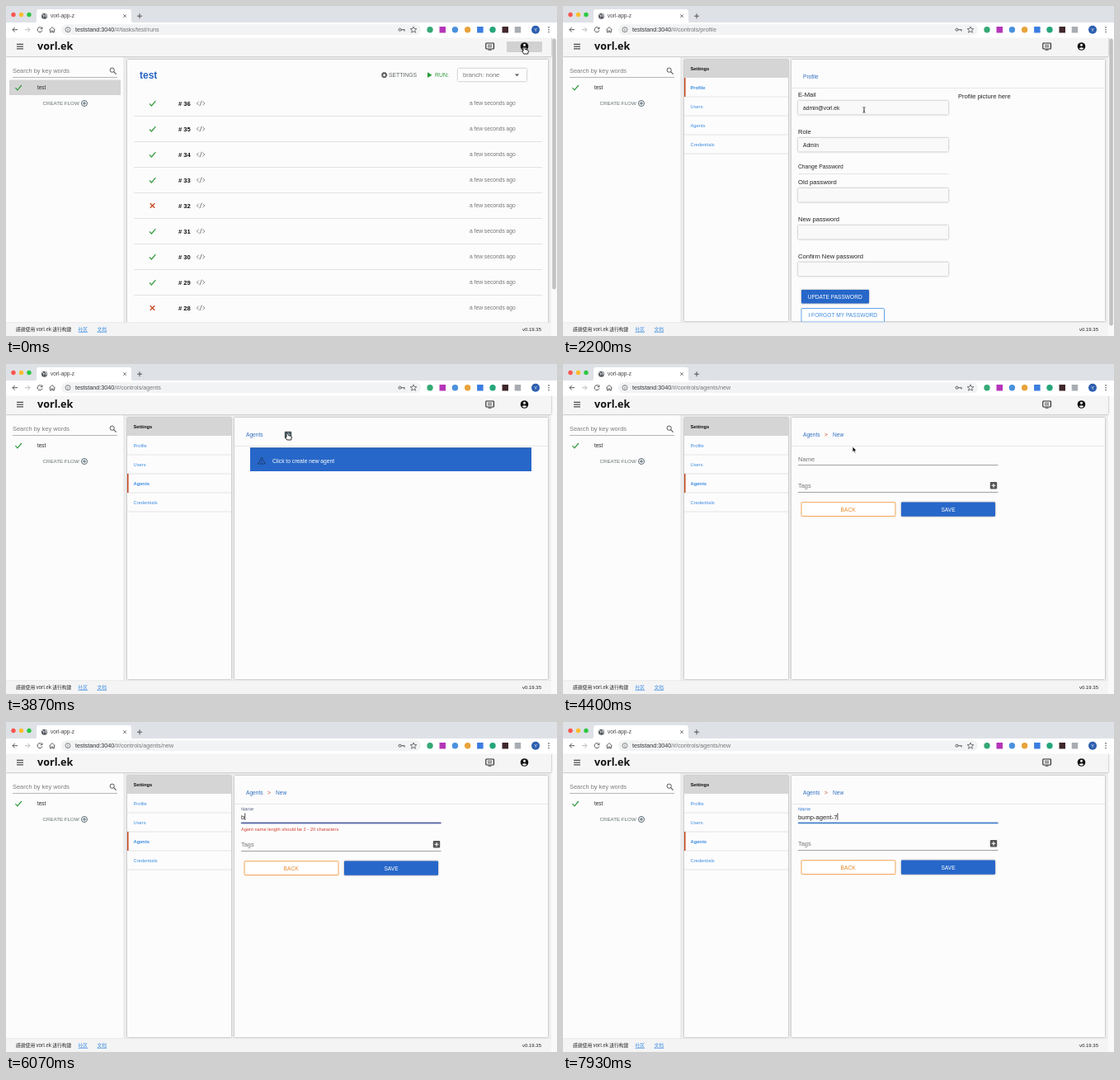
An HTML page for the animation above (8000 ms loop, 668 by 400 pixels).

```html
<!DOCTYPE html>
<html lang="en">
<head>
<meta charset="utf-8">
<title>Agent setup</title>
<style>
  html, body { margin: 0; width: 100%; height: 100%; overflow: hidden; background: #fff; }
  svg { display: block; font-family: "Liberation Sans", Arial, sans-serif; }
  .cjk { font-family: "Noto Sans CJK SC", "Noto Sans CJK", "Liberation Sans", sans-serif; }
  .brand { font-family: "Open Sans", "Noto Sans", sans-serif; }
  .raised { filter: drop-shadow(0 .7px 1px rgba(0,0,0,.4)); }
  .menu { filter: drop-shadow(0 2px 3px rgba(0,0,0,.35)); }
</style>
</head>
<body>
<svg id="stage" width="668" height="400" viewBox="0 0 668 400"></svg>
<script>
const LOOP = 8000;
const BLUE = '#2767c9', LINK = '#3d8de0', CRUMB = '#2f6fc0', GREEN = '#2f9a3c', RED = '#c4471f', INK = '#222', GREY = '#757575';
const OPEN_MENU = 920, TO_PROFILE = 1690, TO_AGENTS = 3070, TO_NEW = 3900, FOCUS = 5000, FIRST_KEY = 5980;
const AGENT = 'bump-agent-7';
const keyTime = i => i ? 6200 + (i - 1) * 150 : FIRST_KEY;

// Drawing helpers
const text = (x, y, size, str, fill = INK, attrs = '') =>
  `<text x="${x}" y="${y}" font-size="${size}" fill="${fill}" ${attrs}>${str}</text>`;
const bold = 'font-weight="700"';
const middle = 'text-anchor="middle"';
const rect = (x, y, w, h, fill, attrs = '') =>
  `<rect x="${x}" y="${y}" width="${w}" height="${h}" fill="${fill}" ${attrs}/>`;
const circle = (x, y, r, fill, attrs = '') => `<circle cx="${x}" cy="${y}" r="${r}" fill="${fill}" ${attrs}/>`;
const line = (d, color, width = 1, attrs = '') =>
  `<path d="${d}" fill="none" stroke="${color}" stroke-width="${width}" ${attrs}/>`;
const fill = (d, color, attrs = '') => `<path d="${d}" fill="${color}" ${attrs}/>`;
const group = (id, ...parts) => `<g id="${id}">${parts.join('')}</g>`;
const check = (x, y) => line(`M${x - 3.6} ${y + .4}l2.5 2.6 5-5.8`, GREEN, 1.2);
const cross = (x, y) => line(`M${x - 2.8} ${y - 2.8}l5.6 5.6m0-5.6l-5.6 5.6`, RED, 1.3);
const plusBox = (x, y, color) => rect(x - 4.2, y - 4.2, 8.4, 8.4, color, 'rx="1"') +
  line(`M${x - 2.4} ${y}h4.8M${x} ${y - 2.4}v4.8`, '#fff', 1.1);
const card = (x, w) => rect(x, 65, w, 317, '#fdfcfd', 'class="raised"');
const crumbLine = line('M277 99.5H657', '#e3e3e3', .8);

function browser() {
  const lights = ['#f9564f', '#fbbc2e', '#2bc840'].map((c, i) => circle(9 + i * 9.5, 10.5, 2.7, c)).join('');
  const badges = ['#35a875', '#b535b9', '#4a91dd', '#e8a33a', '#3b7de0', '#25a67a', '#40272b', '#a9adb3']
    .map((c, i) => i % 3 === 1 || i === 6 ? rect(525.5 + (i - 1) * 15.2, 25, 7.5, 7.5, c) : circle(514 + i * 15.2, 28.7, 3.7, c)).join('');
  return rect(0, 0, 668, 21, '#dee1e6') + lights +
    fill('M34 20.5q3 0 3-3V7q0-3 3-3h109q3 0 3 3v10.5q0 3 3 3z', '#fff') +
    circle(46.5, 12.2, 3.5, '#50555b') + line('M44 10.5l2.5 1-1 2M47 9.5l2 1.5-.7 2.5', '#fff', .9) +
    text(54, 14.4, 6.5, 'vorl-app-z', '#444') +
    line('M142.2 10.3l3.6 3.6m0-3.6l-3.6 3.6', '#555', .8) +
    line('M159 12.2h6m-3-3v6', '#555', 1) +
    rect(0, 20, 668, 18.5, '#fff') + rect(67, 22.3, 436, 12.8, '#f1f3f4', 'rx="6.4"') +
    line('M14 28.7H8m2.7-2.8L8 28.7l2.7 2.8', '#555', 1) +
    line('M23 28.7h6m-2.7-2.8l2.7 2.8-2.7 2.8', '#bbb', 1) +
    line('M43.6 27A3 3 0 1 0 44 29.5M44 25.5V27.7H41.8', '#555', 1) +
    line('M52.3 29l3.7-3.4 3.7 3.4M53.6 28.4v3.6h1.6v-2h1.6v2h1.6v-3.6', '#555', .9) +
    circle(75, 28.7, 3, 'none', 'stroke="#666" stroke-width=".8"') + line('M75 28.2v2.2M75 26.7v.7', '#666', .8) +
    circle(477.5, 28.7, 1.5, 'none', 'stroke="#555" stroke-width="1"') + line('M479 28.7h4v1.8', '#555', 1.1) +
    fill('M494 25l1.1 2.5 2.7.2-2.1 1.8.7 2.7-2.4-1.5-2.4 1.5.7-2.7-2.1-1.8 2.7-.2z', 'none', 'stroke="#555" stroke-width=".8"') +
    badges + circle(642, 28.7, 5, '#2d5faf') + text(642, 30.8, 5.5, 'Y', '#fff', middle) +
    [25.9, 28.7, 31.5].map(y => circle(658, y, .8, '#555')).join('');
}

const address = (id, path) => group(id,
  text(84, 31.2, 7.2, `<tspan fill="#333">teststand:3040</tspan>/#/${path}`, '#777'));

function appBar() {
  return rect(0, 38, 661, 23, '#f5f5f5', 'class="raised"') +
    line('M13 46.3h8M13 49.1h8M13 51.9h8', '#222', 1) +
    text(38, 53.3, 12.6, 'vorl.ek', '#111', `${bold} class="brand"`) +
    rect(581.8, 45, 9.6, 7, 'none', 'rx=".8" stroke="#222" stroke-width="1.1"') +
    line('M584 47.4h5.2M584 49.5h5.2M584.6 53.3h4', '#222', .8) +
    group('hover', rect(607, 43, 43, 13, '#d1d1d1', 'rx="1"')) +
    group('press', rect(607, 43, 43, 13, '#9f9f9f', 'rx="1"')) +
    circle(628.5, 49, 4.8, '#111') + circle(628.5, 47.3, 1.5, '#eee') + fill('M625.6 51.4q2.9-2.4 5.8 0-2.9 2.8-5.8 0z', '#eee');
}

function sidebar() {
  return rect(0, 62, 143, 322, '#fdfcfd') + line('M143 62V384', '#ddd', .8) +
    text(8, 81, 7.45, 'Search by key words', '#7c7c7c') + line('M8 86.5H135', '#999', .7) +
    circle(128.7, 77.7, 2.6, 'none', 'stroke="#555" stroke-width="1"') + line('M130.6 79.7l3 3', '#555', 1.2) +
    group('selected', rect(4, 89.5, 135, 18.5, '#d4d4d4')) +
    check(15, 98.8) + text(38, 101, 6.3, 'test') +
    text(44.5, 120.3, 6.2, 'CREATE FLOW', '#5f6f6c') +
    circle(95, 118, 3.5, 'none', 'stroke="#455a64" stroke-width=".9"') + line('M93 118h4m-2-2v4', '#455a64', .9);
}

function footer() {
  return rect(0, 383.5, 661, 17, '#f4f4f5') + line('M0 383.7H661', '#e4e4e4', .7) +
    text(12, 394, 5.8, '感谢使用 vorl.ek 进行构建', '#222', 'class="cjk"') +
    text(87.5, 394, 5.8, '社区', LINK, 'class="cjk" text-decoration="underline"') +
    text(110.5, 394, 5.8, '文档', LINK, 'class="cjk" text-decoration="underline"') +
    text(649, 393.8, 6, 'v0.19.35', '#222', 'text-anchor="end"');
}

function jobsPage() {
  const rows = Array.from({ length: 9 }, (_, i) => {
    const y = 118 + i * 31, n = 36 - i;
    return (n % 4 === 0 && n < 36 ? cross : check)(177.5, y) +
      text(209, y + 2.6, 7.6, `# ${n}`, '#111', bold) +
      line(`M233.7 ${y - 2.3}l-2.3 2.3 2.3 2.3m4.8-4.6l2.3 2.3-2.3 2.3m-1.2-5.6l-2.4 6.6`, '#666', .8) +
      text(562, y + 2.4, 6.7, 'a few seconds ago', GREY) +
      (i < 8 ? line(`M155 ${y + 15.5}H650`, '#dcdcdc', .8) : '');
  }).join('');
  return group('jobs', rect(147, 65, 510, 325, '#fdfcfd', 'class="raised"'),
    text(162, 87.6, 12, 'test', '#2565c2', bold),
    circle(458.6, 83.7, 2.3, 'none', 'stroke="#555" stroke-width="1.6"'),
    circle(458.6, 83.7, 3.3, 'none', 'stroke="#555" stroke-width="1" stroke-dasharray="1.3 1.3"'),
    text(464, 86.1, 6.8, 'SETTINGS', '#5d6663'),
    fill('M511 80.3l5.6 3.4-5.6 3.4z', GREEN), text(520, 86.1, 6.9, 'RUN:', GREEN),
    rect(548, 76, 83, 15, '#fdfdfd', 'class="raised"'), text(554, 86.3, 7.6, 'branch: none', '#777'),
    fill('M617 82.6h5l-2.5 2.7z', '#555'), rows);
}

function settingsNav() {
  const names = ['Profile', 'Users', 'Agents', 'Credentials'];
  const items = names.map((name, i) => {
    const y = 87 + i * 23;
    return line(`M147 ${y + 23}H273`, '#dedede', .8) +
      group(`plain${name}`, text(154.5, y + 13.6, 5.75, name, LINK)) +
      group(`bold${name}`, text(154.5, y + 13.6, 5.75, name, LINK, bold)) +
      group(`mark${name}`, rect(147, y, 1.5, 23, RED));
  }).join('');
  return card(147, 126) + rect(147, 65, 126, 22, '#d4d5d4') +
    text(154.5, 78, 5.75, 'Settings', '#111', bold) +
    group('navHover', rect(147, 133, 126, 23, '#f0f0f0')) + items + card(277, 380) + crumbLine;
}

function profilePage() {
  const field = (label, y, value = '') => text(285, y, 7.65, label) +
    rect(285, y + 5, 182, 16.5, '#f9f9f9', 'class="raised"') + text(291, y + 15.8, 6.65, value);
  return group('profile', text(291, 88, 6.6, 'Profile', CRUMB),
    field('E-Mail', 110, 'admin@vorl.ek'), field('Role', 155, 'Admin'),
    text(285, 196.8, 6.7, 'Change Password'), line('M285 203.5H467', '#ddd', .8),
    field('Old password', 216), field('New password', 261), field('Confirm New password', 305.7),
    text(479, 111.6, 7.6, 'Profile picture here'),
    rect(289, 344, 82, 16.5, BLUE, 'rx="1" class="raised"'), text(329.7, 354.5, 6.6, 'UPDATE PASSWORD', '#fff', middle),
    rect(289, 366.5, 100.5, 16.5, '#fff', `rx="1" stroke="${LINK}" stroke-width=".8"`),
    text(339.3, 377.2, 6.65, 'I FORGOT MY PASSWORD', LINK, middle));
}

function agentsPage() {
  return group('agents', text(291, 88, 6.6, 'Agents', CRUMB), plusBox(342, 86, '#455a64'),
    rect(296, 101.5, 341, 28.5, BLUE), line('M296 102H637', '#1e529f', 1),
    line('M310 113l4.4 8h-8.8zM310 116v2.5m0 .6v.8', '#1a3d70', .9),
    text(323, 119.5, 6.7, 'Click to create new agent', '#fff'));
}

function newPage() {
  const letters = [...AGENT].map(c => `<tspan class="letter">${c}</tspan>`).join('');
  return group('new', text(291, 88, 6.6, 'Agents', CRUMB), text(317, 88, 6.6, '&gt;', RED), text(327, 88, 6.6, 'New', CRUMB),
    group('label', text(0, 0, 7.6, 'Name', 'currentColor')),
    line('M285 122.5H527.5', '#8b8b8b', .8),
    group('underline', line('M-121.2 0H121.2', 'currentColor', 1.5)),
    text(285, 117.5, 7.6, letters, '#222', 'id="typed"'),
    group('caret', group('caretBlink', rect(285.2, 110.5, .8, 8.4, '#222'))),
    group('error', text(285, 131.8, 5.7, 'Agent name length should be 2 - 20 characters', '#d0402f')),
    group('lower', text(285, 149.9, 7.4, 'Tags', GREY), line('M285 155.5H527.5', '#8b8b8b', .8), plusBox(522, 147.3, '#555'),
      rect(289, 167.7, 114, 16.8, '#fff', 'rx="1" stroke="#ee9a45" stroke-width=".9"'),
      text(345.7, 178.5, 6.7, 'BACK', '#e58a2c', middle),
      rect(410, 167.5, 114, 17.2, BLUE, 'rx="1" class="raised"'), text(467, 178.5, 6.6, 'SAVE', '#fff', middle)));
}

function menu() {
  return group('menu', rect(589, 55.5, 66, 77, '#fff', 'class="menu"'),
    group('menuHover', rect(589, 84, 66, 22, '#eee')),
    line('M589 83H655', '#ddd', .7),
    ...['admin@vorl.ek', 'Settings', 'Logout'].map((s, i) => text(597, [73.6, 97, 119.9][i], 6.6, s, '#777')));
}

function pointer() {
  const outline = 'stroke="#fff" stroke-width=".7" stroke-linejoin="round"';
  return group('pointer',
    group('hand', fill('M-2-3q1-1 1.6.2L.5-.4l3 .8q1 .3.8 1.5L3.7 5h-5L-3.5 1.7q.2-1.1 1.6-.2z', '#fff',
      'stroke="#111" stroke-width=".9" stroke-linejoin="round"')),
    group('arrow', fill('M0-3v7l1.6-1.4 1.1 2.5 1.2-.5-1.1-2.5H5z', '#111', outline)),
    group('beam', line('M-1.5-3.3q1.5 0 1.5 1.1v4.4q0 1.1-1.5 1.1M1.5-3.3Q0-3.3 0-2.2M0 2.2Q0 3.3 1.5 3.3M-.8.9h1.6', '#222', .8)));
}

const $ = id => document.getElementById(id);
$('stage').innerHTML = rect(0, 0, 668, 400, '#f0f0f1') + rect(661, 38, 7, 362, '#fafafa') +
  sidebar() + jobsPage() + group('settings', settingsNav(), profilePage(), agentsPage(), newPage()) +
  footer() + appBar() + browser() +
  address('urlJobs', 'tasks/test/runs') + address('urlProfile', 'controls/profile') +
  address('urlAgents', 'controls/agents') + address('urlNew', 'controls/agents/new') +
  group('longScroll', rect(662.3, 39.5, 4.5, 304, '#c1c1c1', 'rx="2.2"')) +
  group('shortScroll', rect(662.3, 39.5, 4.5, 348, '#c1c1c1', 'rx="2.2"')) + menu() + pointer();

// Motion helpers
function play(node, prop, keys, easing = 'linear') {
  const all = [[0, keys[0][1]], ...keys, [LOOP, keys[keys.length - 1][1]]];
  node.animate(all.map(([ms, value]) => ({ offset: ms / LOOP, [prop]: value, easing })),
    { duration: LOOP, iterations: Infinity });
}
function show(node, from, to, fadeIn = 0, fadeOut = 0, prop = 'opacity') {
  const keys = from ? [[from, 0], [from + fadeIn, 1]] : [[0, 1]];
  if (to < LOOP) keys.push([to, 1], [to + fadeOut, 0]);
  play(node, prop, keys);
}
const spans = (node, list) => play(node, 'opacity',
  [[0, list[0][0] ? 0 : 1], ...list.flatMap(([a, b]) => [...(a ? [[a, 0], [a, 1]] : []), [b, 1], [b, 0]])]);
const move = (x, y, scale = '') => `translate(${x}px, ${y}px) ${scale}`;

[
  ['jobs', 0, TO_PROFILE], ['settings', TO_PROFILE, LOOP],
  ['profile', TO_PROFILE, TO_AGENTS], ['agents', TO_AGENTS, TO_NEW], ['new', TO_NEW, LOOP],
  ['urlJobs', 0, TO_PROFILE], ['urlProfile', TO_PROFILE, TO_AGENTS], ['urlAgents', TO_AGENTS, TO_NEW], ['urlNew', TO_NEW, LOOP],
  ['longScroll', 0, TO_PROFILE], ['shortScroll', TO_PROFILE, TO_AGENTS],
  ['selected', 0, TO_PROFILE, 0, 120],
  ['hover', 0, 1250, 0, 150], ['press', 880, 1250, 80, 250],
  ['menu', OPEN_MENU, 1660, 100, 180], ['menuHover', 1380, 1700],
  ['markProfile', TO_PROFILE, TO_AGENTS], ['boldProfile', TO_PROFILE, 3180], ['plainProfile', 3180, LOOP],
  ['markAgents', TO_AGENTS, LOOP], ['boldAgents', 3180, LOOP], ['plainAgents', 0, 3180],
  ['navHover', 2800, 3300, 60, 100],
  ['error', FIRST_KEY, 6200, 90, 100]
].forEach(([id, ...times]) => show($(id), ...times));
['boldUsers', 'boldCredentials', 'markUsers', 'markCredentials'].forEach(id => $(id).remove());

play($('pointer'), 'transform', [
  [0, 629, 53], [1100, 629, 53], [1450, 608, 96], [1680, 608, 96], [2120, 365, 126], [2350, 365, 126],
  [2870, 165, 152], [3200, 165, 152], [3620, 342, 87], [4000, 342, 87], [4400, 351, 103], [4800, 345, 116]
].map(([ms, x, y]) => [ms, move(x, y)]), 'ease-in-out');
spans($('hand'), [[0, 1750], [2700, 3300], [3540, 4050]]);
spans($('arrow'), [[1750, 2050], [2450, 2700], [3300, 3540], [4050, 4620]]);
spans($('beam'), [[2050, 2450], [4620, FIRST_KEY]]);

play($('label'), 'transform', [[FOCUS, move(285, 117.5, 'scale(1)')], [FOCUS + 200, move(285, 107, 'scale(.75)')]], 'ease-out');
play($('label'), 'color', [[FOCUS, GREY], [FOCUS + 200, '#2e78d2'], [FIRST_KEY, '#2e78d2'], [6070, '#53617f'], [6200, '#53617f'], [6330, '#2e78d2']]);
play($('underline'), 'transform', [[FOCUS, move(406.2, 122.4, 'scale(0, 1)')], [FOCUS + 250, move(406.2, 122.4, 'scale(1, 1)')]], 'ease-out');
play($('underline'), 'color', [[FIRST_KEY, '#2e78d2'], [6070, '#3f559f'], [6200, '#3f559f'], [6330, '#2e78d2']]);
play($('lower'), 'transform', [[FIRST_KEY, move(0, 0)], [6050, move(0, 1)], [6200, move(0, 1)], [6330, move(0, 0)]]);

document.querySelectorAll('.letter').forEach((node, i) => show(node, keyTime(i), LOOP, 0, 0, 'fillOpacity'));
play($('caret'), 'transform', [[0, move(0, 0)],
  ...[...AGENT].map((_, i) => [keyTime(i), move($('typed').getSubStringLength(0, i + 1), 0)])], 'steps(1, end)');
spans($('caretBlink'), [[FOCUS, 5500], [FIRST_KEY, LOOP]]);
</script>
</body>
</html>
```
